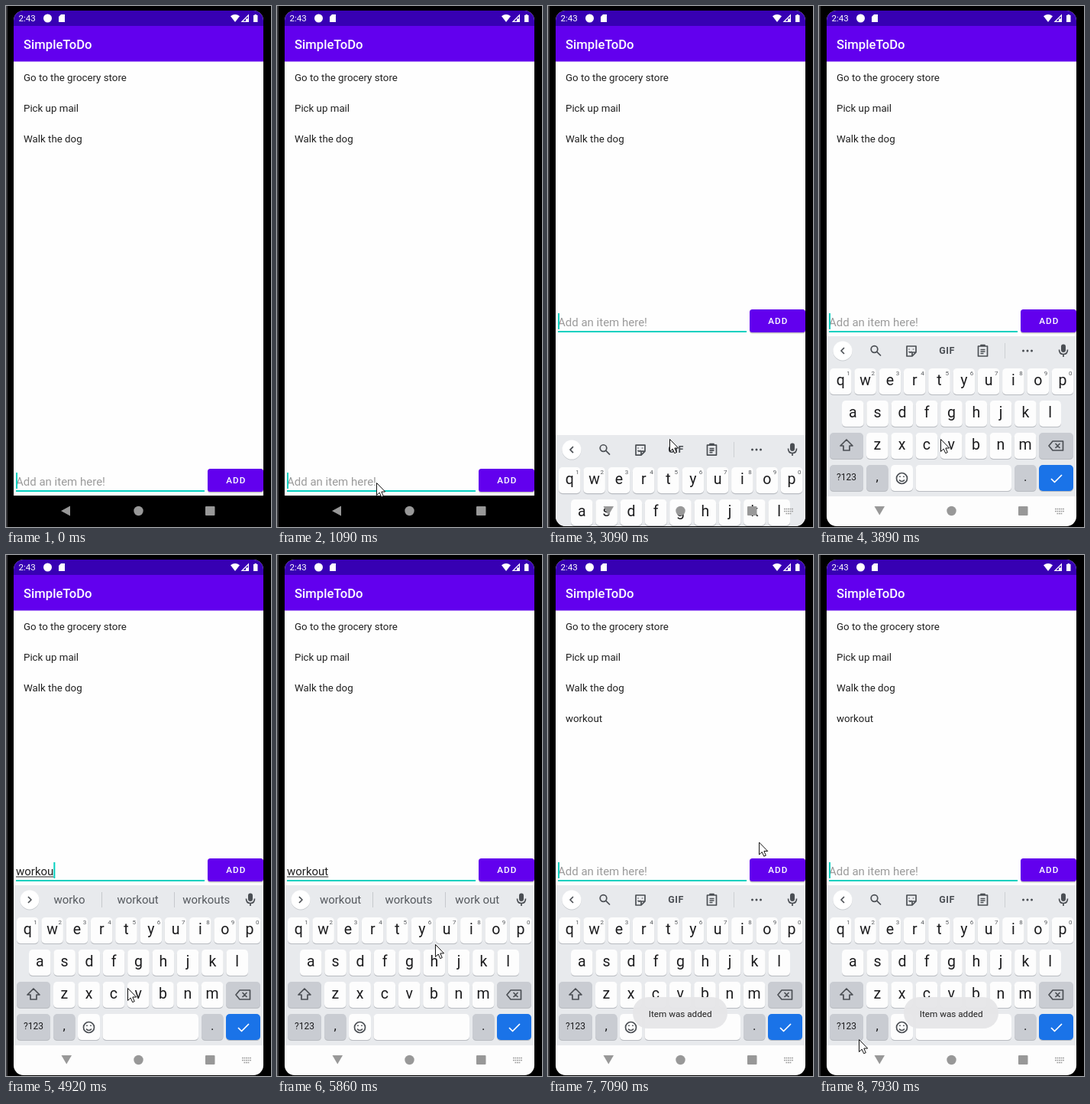
An HTML page for the animation above (8000 ms loop, 347 by 680 pixels).

```html
<!DOCTYPE html>
<html lang="en">
<head>
<meta charset="utf-8">
<style>
  html, body { margin: 0; width: 100%; height: 100%; overflow: hidden; background: #000; }
  svg { display: block; width: 347px; height: 680px; }
  text { font: 13.3px Roboto, sans-serif; fill: #202020; white-space: pre; }
  .mid { text-anchor: middle; }
  .key { fill: #1c1c1e; }
  .hint { font-size: 8px; fill: #55585c; }
  .tip { font-size: 15px; fill: #55595e; }
  .line { fill: none; stroke: #4b4f54; stroke-width: 1.7; stroke-linejoin: round; }
</style>
</head>
<body>
<svg viewBox="0 0 347 680">
  <defs>
    <clipPath id="screen"><rect x="10" y="6" width="327" height="673" rx="13"/></clipPath>
  </defs>
  <rect width="347" height="680"/>
  <rect width="2" height="680" fill="#38383b"/>
  <g clip-path="url(#screen)">
    <rect x="10" y="6" width="327" height="633" fill="#fefefe"/>
    <rect x="10" y="6" width="327" height="20" fill="#3700b3"/>
    <rect x="10" y="26" width="327" height="46.5" fill="#6200ee"/>
    <text x="16.5" y="20.3" style="font-size:11.6px;fill:#fff">2:43</text>
    <g fill="#fff">
      <circle cx="54.5" cy="16" r="5.5"/>
      <path d="M72 11h5v10h-8v-7z"/>
      <path d="M294 13.3Q300 8.7 306 13.3L300 21z"/>
      <path d="M318 10.5V21H307.500zM316.8 13.500L310.500 19.800H314V16.500H316.800z" fill-rule="evenodd"/>
      <path d="M324 12h1.5v-1h2.5v1h1.500v9h-5.500z"/>
    </g>
    <text x="23" y="56" style="font-size:16.65px;font-weight:500;fill:#fff">SimpleToDo</text>
    <g id="list"></g>

    <g id="entry">
      <text id="field" x="13" y="626" style="font-size:15px"></text>
      <rect id="composing" x="13" y="627.5" height="1" fill="#202020"/>
      <rect x="13" y="632" width="247" height="2" fill="#03d0c0"/>
      <rect id="caret" y="609" width="2" height="21" fill="#03d0c0"/>
      <rect x="264" y="605.5" width="73" height="30" rx="3.5" opacity=".22"/>
      <rect x="264" y="604" width="73" height="30" rx="3.5" fill="#6200ee"/>
      <rect id="ripple" x="264" y="604" width="73" height="30" rx="3.5" fill="#fff"/>
      <text class="mid" x="301.3" y="623.4" style="font-size:11.7px;font-weight:500;letter-spacing:1.05px;fill:#fff">ADD</text>
    </g>

    <rect id="nav" x="10" y="639" width="327" height="41"/>
    <g id="keyboard">
      <rect x="10" y="431" width="327" height="209" fill="#e8eaed"/>
      <circle cx="31" cy="451" r="12.5" fill="#c9ccd0"/>
      <circle cx="31" cy="450" r="12.5" fill="#fff"/>
      <path id="chevron" class="line"/>
      <g id="tools" class="line">
        <circle cx="72.5" cy="448" r="4.3"/><path d="M75.8 451.3L81 456.5"/>
        <path d="M115 444h12v8l-5 5h-7zM122 457v-5h5M118 447.5v1M123.5 447.5v1M117.5 451q2 2 4 0"/>
        <path d="M208.5 444h12v13h-12zM212 444v-1.5h5V444M211.5 448.5h6M211.5 451h6M211.5 453.5h4"/>
        <path d="M243.5 440v20" style="stroke:#cdd0d4;stroke-width:1"/>
        <path d="M267.5 450h.01M273 450h.01M278.5 450h.01" style="stroke-width:3;stroke-linecap:round"/>
        <text class="mid" x="167.5" y="454" style="font-size:12.5px;font-weight:700;fill:#4b4f54;stroke:none;letter-spacing:.5px">GIF</text>
      </g>
      <g id="tips">
        <path d="M125.5 440v20M220.5 440v20" stroke="#c6c9cd"/>
        <text class="tip mid" x="83" y="455"></text>
        <text class="tip mid" x="172.5" y="455"></text>
        <text class="tip mid" x="262.3" y="455"></text>
      </g>
      <rect x="317" y="441.5" width="6" height="10.5" rx="3" fill="#4b4f54"/>
      <path class="line" d="M314.5 448.5q0 6 5.5 6t5.5-6M320 454.5v3.5"/>
      <g id="keys"></g>
      <path class="line" d="M36 566l8 8h-4v6h-8v-6h-4z"/>
      <path class="line" d="M306 568h13.5v12H306l-5-6zM309.5 571l6 6m0-6l-6 6"/>
      <g class="line">
        <circle cx="108.500" cy="616.5" r="7"/>
        <path d="M105 618.5q3.5 4 7 0M106 613.5v1.5M111 613.5v1.5"/>
      </g>
      <path class="line" d="M304 617l4.5 4.5L318 612" style="stroke:#fff"/>
    </g>
    <g fill="#989898">
      <path id="back"/>
      <circle cx="173.5" cy="659" r="6.2"/>
      <rect x="261" y="653" width="12.5" height="12" rx="1"/>
      <path id="ime" d="M309 656.5h12M309 659.5h12M311.5 662.5h7" stroke="#989898" stroke-width="1.7" stroke-dasharray="1.7 .85"/>
    </g>
    <g id="toast">
      <rect x="111" y="577" width="124" height="41" rx="20" fill="#e6e6e9" opacity=".96"/>
      <text class="mid" x="173.2" y="602.7" style="font-size:11.7px">Item was added</text>
    </g>
  </g>
  <path id="pointer" d="M.5.5V16.5L4.200 13.1 6.7 18.7 9.3 17.6 6.8 12H11.7z" fill="#fff" stroke="#111"/>
</svg>
<script>
const LOOP = 8000, ENTER = 150, FOCUS = 2820, OPEN = 3090, SUBMIT = 6670;
const TYPING = 4020, KEY_TIME = 150, BLINK = 975;
const WORD = 'workout';

const $ = id => document.getElementById(id);
const set = (id, attrs) => Object.entries(attrs).forEach(([k, v]) => $(id).setAttribute(k, v));
const show = (id, on) => $(id).style.display = on ? '' : 'none';
const clamp = (v, lo, hi) => Math.min(hi, Math.max(lo, v));
const progress = (t, from, to) => clamp((t - from) / (to - from), 0, 1);
const smooth = p => p * p * (3 - 2 * p);

$('list').innerHTML = ['Go to the grocery store', 'Pick up mail', 'Walk the dog', WORD]
  .map((label, i) => `<text x="23" y="${98 + 40 * i}">${label}</text>`).join('');

const GRAY = '#c9ccd2', PITCH = 32.3;
function key(x, y, w, label = '', fill = '#fdfdfd', size = 19.5) {
  const box = (dy, color) => `<rect x="${x}" y="${y + dy}" width="${w}" height="34" rx="5" fill="${color}"/>`;
  return box(1.1, '#b9bcc1') + box(0, fill) +
    `<text class="key mid" x="${x + w / 2}" y="${y + 15.3 + size * .35}" style="font-size:${size}px">${label}</text>`;
}
const row = (letters, x, y) => [...letters].map((c, i) => key(x + i * PITCH, y, 28.6, c)).join('');
$('keys').innerHTML =
  row('qwertyuiop', 14, 473) + row('asdfghjkl', 30, 515) + row('zxcvbnm', 62, 557) +
  [...'1234567890'].map((d, i) => `<text class="hint mid" x="${38.5 + i * PITCH}" y="482">${d}</text>`).join('') +
  key(14, 557, 44, '', GRAY) + key(288, 557, 45, '', GRAY) +
  key(14, 599, 44, '?123', GRAY, 12) + key(62, 599, 28.5, ',', GRAY, 17) +
  key(94, 599, 29) + key(126.5, 599, 125.5) +
  key(256, 599, 28.5, '.', GRAY, 17) + key(288, 599, 45, '', '#1a73e8');

// Pointer moves: start, end, destination.
const moves = [
  [150, 420, 215, 535], [420, 1090, 130, 622], [2600, 2940, 159, 565],
  [5400, 6530, 291, 408], [6820, 7240, 270, 361], [7400, 7800, 62, 650], [7800, 7930, 52, 632]];
const pointerAt = t => moves.reduce(([x, y], [from, to, toX, toY]) => {
  const p = smooth(progress(t, from, to));
  return [x + (toX - x) * p, y + (toY - y) * p];
}, [287, 643]);

const typedCount = t => clamp(Math.floor((t - TYPING) / KEY_TIME), 0, WORD.length);
const typedAt = t => t < SUBMIT ? WORD.slice(0, typedCount(t)) : '';

function caretOn(t) {
  const count = typedCount(t);
  const lastEdit = t >= SUBMIT ? SUBMIT : count ? TYPING + KEY_TIME * count : 0;
  return (t - lastEdit + 15) % BLINK < BLINK / 2;
}

function draw(t) {
  const open = t >= OPEN;
  set('pointer', { transform: `translate(${pointerAt(t)})` });
  show('pointer', t >= ENTER);
  set('entry', { transform: `translate(0 ${open ? -208 : 0})` });
  set('keyboard', { transform: `translate(0 ${130 * (1 - progress(t, OPEN, 3360)) ** 2})` });
  set('nav', { fill: open ? '#fdfdfd' : '#000' });
  set('back', { d: open ? 'M72.5 653H86L79.25 664.5z' : 'M84 652.5V665.5L72 659z' });
  show('keyboard', open);
  show('ime', t >= FOCUS);

  const text = typedAt(t);
  $('field').textContent = text || 'Add an item here!';
  $('field').style.fill = text ? '#202020' : '#9b9b9b';
  const width = text ? $('field').getComputedTextLength() : 0;
  set('composing', { width });
  set('caret', { x: 13 + width });
  show('caret', caretOn(t));

  // Suggestions trail the typing by one key.
  const stem = typedAt(t - KEY_TIME);
  const words = [...new Set([stem, WORD, WORD + 's', 'work out'])];
  show('tips', stem);
  show('tools', !stem);
  set('chevron', { d: stem ? 'M29 446l4 4-4 4' : 'M33 446l-4 4 4 4' });
  document.querySelectorAll('.tip').forEach((el, i) => el.textContent = words[i]);

  $('list').lastChild.style.opacity = progress(t, SUBMIT - 50, SUBMIT + 90);
  set('ripple', { opacity: .2 * (progress(t, 6500, SUBMIT) - progress(t, SUBMIT + 10, 6960)) });
  set('toast', { opacity: progress(t, SUBMIT - 20, 6960) });
}
function tick() {
  draw(performance.now() % LOOP);
  requestAnimationFrame(tick);
}
tick();
</script>
</body>
</html>
```
